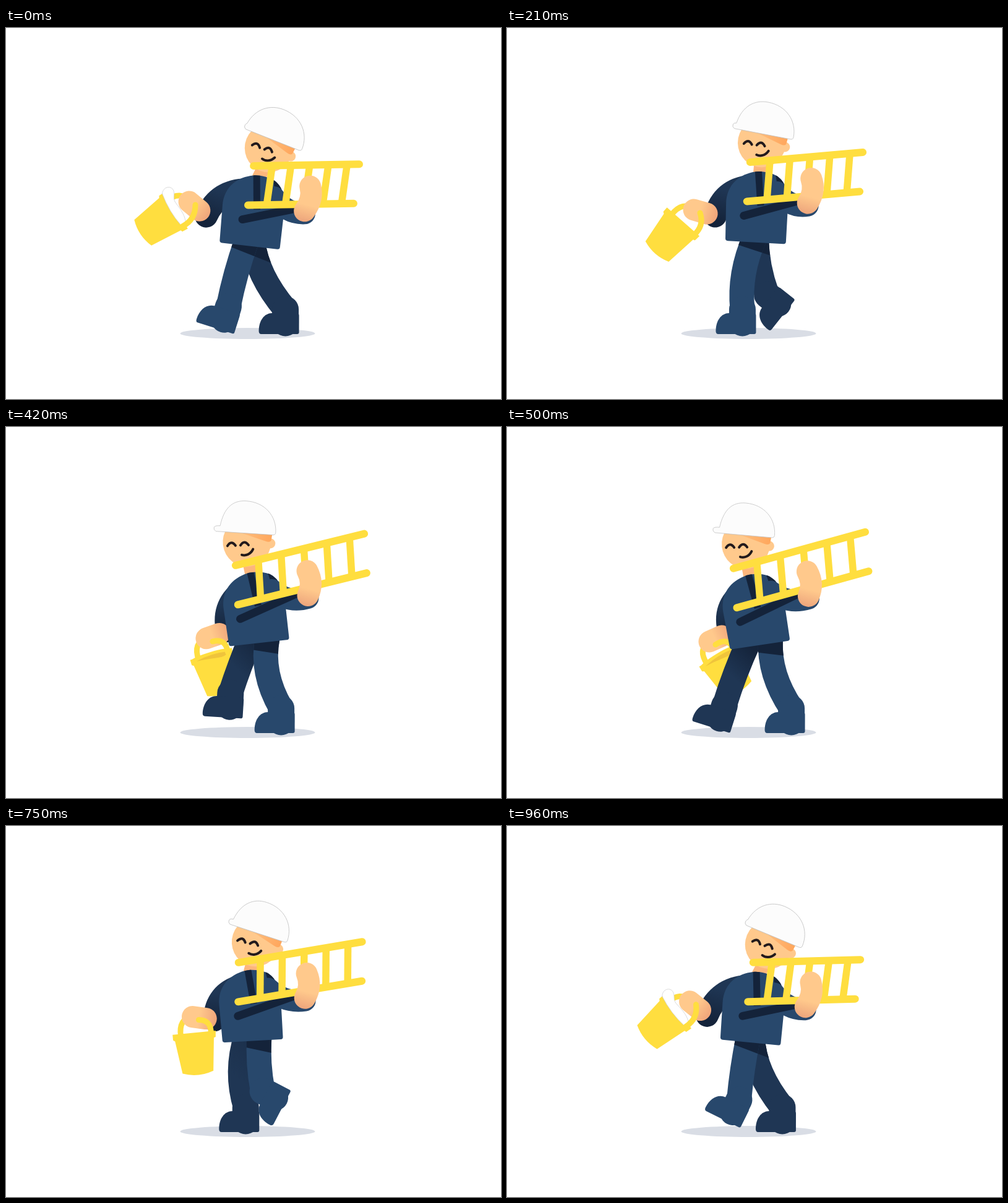
These frames come from a looping animation (800 px wide and 600 px high, 1 s). An HTML page with a canvas:

```html
<!DOCTYPE html>
<html lang="en">
<head>
<meta charset="utf-8">
<title>Walking builder</title>
<style>
html, body { margin: 0; width: 100%; height: 100%; overflow: hidden; background: #fff; }
canvas { display: block; width: 100vw; height: 100vh; }
</style>
</head>
<body>
<canvas id="stage" width="800" height="600"></canvas>
<script>
const g = document.getElementById('stage').getContext('2d');
const BLUE = '#28486c', NAVY = '#1f3654', DARK = '#14233a';
const YELLOW = '#ffde3f', SKIN = '#ffc98c', INK = '#221a1c';
const STEPS = 24, LOOP = 1000, FLOOR = 495;

const rad = deg => deg * Math.PI / 180;
const clamp = v => Math.max(0, Math.min(1, v));
const cyc = (f, n = STEPS) => Math.cos(2 * Math.PI * f / n);

// One swing per loop, plus an optional one per footstep; each with its peak step
const wave = (f, mean, amp, peak, amp2 = 0, peak2 = 0) =>
  mean + amp * cyc(f - peak) + amp2 * cyc(f - peak2, STEPS / 2);

// The body sinks sharply when a foot lands
const bob = f => 7 * ((1 + cyc(f - 1, STEPS / 2)) / 2) ** 5 - 1.7 * cyc(f - 3, STEPS / 2);

// Maps points of a turned part to the stage
function turn(x, y, deg) {
  const c = Math.cos(rad(deg)), s = Math.sin(rad(deg));
  return (px, py) => [x + px * c - py * s, y + px * s + py * c];
}

function local(x, y, deg, draw) {
  g.save();
  g.translate(x, y);
  g.rotate(rad(deg));
  draw();
  g.restore();
}

const fill = (d, color) => { g.fillStyle = color; g.fill(new Path2D(d)); };

function line(d, color, w, cap = 'round') {
  g.strokeStyle = color;
  g.lineWidth = w;
  g.lineCap = cap;
  g.lineJoin = 'round';
  g.stroke(new Path2D(d));
}

function ramp(x0, y0, x1, y1, from, to) {
  const r = g.createLinearGradient(x0, y0, x1, y1);
  r.addColorStop(0, from);
  r.addColorStop(1, to);
  return r;
}

function dot(x, y, rx, ry, color) {
  g.fillStyle = color;
  g.beginPath();
  g.ellipse(x, y, rx, ry, 0, 0, 7);
  g.fill();
}

function torsoPose(f) {
  const x = wave(f, 401.3, 8, 10.8), y = 347.6 + bob(f), deg = wave(f, -.95, 7.8, 1.1);
  return { x, y, deg, at: turn(x, y, deg) };
}

// p = 0: the heel lands; p = 12: the foot starts to leave the floor
function legPose(p, side, body) {
  const s = Math.max(0, p / 12 - 1);
  const lift = 70 * Math.sin(Math.PI * s ** 1.2) ** 2;
  const near = (p - 22.8 + 36) % STEPS - 12;
  const toeUp = Math.abs(near) < 2.5 ? 33 * Math.cos(Math.PI * near / 5) ** 2 : 0;
  const heel = { x: wave(p, 428, 60.6, 13.4, 7, 6) + side * 4, y: FLOOR - lift, deg: toeUp - .93 * lift };
  const at = turn(heel.x, heel.y, heel.deg);
  const hip = [body.x + wave(p, 0, 12, 13.5) + side * 6, body.y - 8];
  const ankle = at(-22, -40);
  const bend = 2 * wave(p, -6, 5, 9.5 + 12);
  const knee = [(hip[0] + ankle[0]) / 2 + bend, (hip[1] + ankle[1]) / 2];
  const limb = `M${hip}Q${knee} ${ankle}`;
  return { heel, limb, hip, knee, cuff: `M${ankle}L${at(-22, -18)}` };
}

function drawLeg(leg, body, color, shade) {
  line(leg.limb, color, 40);
  line(leg.cuff, color, 43);
  if (shade > 0) {
    const [hx, hy] = leg.hip, [kx, ky] = leg.knee;
    line(leg.limb, ramp(hx + 10, hy + 18, kx - 4, ky + 6, `rgba(20,35,58,${shade})`, 'rgba(20,35,58,0)'), 40);
  }
  local(leg.heel.x, leg.heel.y, leg.heel.deg, () =>
    fill('M-3,0H-61Q-65,0 -65,-5C-65,-22 -56,-34 -43,-34H-4Q0,-34 0,-30V-3Q0,0 -3,0Z', color));
  // Shade under the jacket
  g.save();
  const corners = [[-70, -30], [70, -30], [70, 32], [-70, -6]].map(c => body.at(...c));
  g.clip(new Path2D(`M${corners.join('L')}Z`));
  if (shade <= 0) line(leg.limb, DARK, 40);
  g.restore();
}

function drawBucket(x, y, deg, f) {
  local(x, y, deg, () => {
    fill('M-35,-2H35L34,8L31,9L25,62Q0,71 -25,62L-32,9L-35,7Z', YELLOW);
    g.globalAlpha = clamp(3 * cyc(f - 11));
    dot(0, 0, 34, 5, YELLOW);
    fill('M-26,3Q0,-3 28,2Q22,10 8,7Q-10,4 -26,3Z', '#efc43c');
    g.globalAlpha = clamp((deg - 45) / 4);
    const paint = 'M-35,1C-44,-6 -39,-19 -29,-17C-21,-15 -20,-8 -9,-9C4,-10 16,-10 26,-4L24,4Q-4,8 -35,1Z';
    fill(paint, '#fff');
    line(paint, '#cfcfcf', .7);
  });
}

function drawRearArm(f, body) {
  const fx = wave(f, 307.5, 15.6, 11.5, 4, 0), fy = wave(f, 310, 33.1, 12.3, 5, 10.8);
  const along = turn(fx, fy, wave(f, 8, 32, 0));
  const [sx, sy] = body.at(-13, -90), [wx, wy] = along(36, 0);
  const len = Math.hypot(wx - sx, wy - sy);
  const ex = (sx + wx) / 2 - 26 * (wy - sy) / len, ey = (sy + wy) / 2 + 26 * (wx - sx) / len;
  line(`M${sx},${sy}Q${ex},${ey} ${wx},${wy}`, ramp(ex, ey, wx, wy + 8, NAVY, DARK), 37);

  const deg = wave(f, 12.5, 47.4, 1.5);
  const [bx, by] = turn(fx, fy, deg)(0, 28);
  const at = turn(bx, by, deg);
  line(`M${at(-22, 2)}Q${at(-23, -28)} ${fx},${fy}`, YELLOW, 9);
  drawBucket(bx, by, deg, f);
  line(`M${along(22, 0)}L${fx},${fy}`, ramp(...along(38, 0), ...along(10, 0), '#f0a67b', SKIN), 35);
  line(`M${fx + 10},${fy + 5}Q${at(30, -20)} ${at(27, 3)}`, YELLOW, 9);
}

const jacket = new Path2D('M-45,0H45Q49,0 49,-4V-60C49,-85 43,-100 29,-109C17,-115 1,-116 -7,-114C-31,-109 -52,-92 -51,-60L-49,-4Q-49,0 -45,0Z');

function drawTorso(body) {
  local(body.x, body.y, body.deg, () => {
    g.fillStyle = BLUE;
    g.fill(jacket);
    g.clip(jacket);
    line('M-2,-118L5,-60', DARK, 11, 'butt');
    line('M31,-116L41,-68', DARK, 11, 'butt');
  });
}

function drawHead(x, y, f) {
  const deg = wave(f, 13.4, 9.6, 22), nub = wave(f, 6, 4, 12);
  local(x, y, deg, () => {
    dot(38, 0, 8, 8, SKIN);
    dot(0, 0, 39, 40, SKIN);
    fill('M-18,-16L30,-3Q37,-1 39,-5L40,-16Z', ramp(-18, -16, 36, -6, '#ffc284', '#ffa85e'));
    local(-19 - nub * .6, 4 + nub * .25, wave(f, -4.5, 2, 0), () => {
      const eye = 'M-6.5,1.5Q0,-8 6.5,1.5';
      line(eye, INK, 4);
      line('M16,17C22,19 30,17 34.5,8.5', INK, 4);
      g.translate(21, 0);
      line(eye, INK, 4);
    });
    g.translate(-48 - nub * .7, -15);
    g.scale(1.02, 1.02);
    const hat = `M3,1Q-1,-1 0,-5Q1,-8 ${nub},-8C${nub + 4},-36 26,-50 48,-50C78,-50 98,-29 98,-3Q98,1 94,1Z`;
    fill(hat, '#fcfcfc');
    line(hat, '#bdbdbd', .7);
  });
}

// Both rails share tilt and length; the lower one slides as the ladder tips
function ladderPose(f, hx, hy) {
  const deg = wave(f, -8.2, 7.4, .7), half = wave(f, 98, 13, 13);
  const slide = -10 - deg;
  const x = hx + wave(f, -9.5, 3.5, 1), y = hy - 34.5;
  return { half, slide, top: turn(x, y, deg), low: turn(x + slide, y + 63.5, deg) };
}

function drawLadder({ half, top, low }) {
  for (let i = 1; i <= 5; i++) {
    const k = half * (.354 * i - 1);
    line(`M${top(k, 0)}L${low(k, 0)}`, YELLOW, 11.5, 'butt');
  }
  for (const rail of [top, low]) line(`M${rail(-half, 0)}L${rail(half, 0)}`, YELLOW, 12);
}

function draw(f) {
  g.fillStyle = '#fff';
  g.fillRect(0, 0, 800, 600);
  dot(390.5, 494, 109, 9, '#d9dde5');

  const body = torsoPose(f);
  const headX = wave(f, 405.5, 19.5, .3), headY = wave(f, 186.4, 2.3, 22.5) + bob(f);
  const topX = wave(f, 488.5, 4, 2.5), topY = wave(f, 240, 11.3, .5) + bob(f);
  const lowX = wave(f, 485, 3, 9.5), lowY = topY + 39.7;
  const ladder = ladderPose(f, topX, topY);

  drawRearArm(f, body);
  const stride = cyc(f - 13);
  drawLeg(legPose((f + STEPS / 2) % STEPS, -1, body), body, NAVY, stride);
  drawLeg(legPose(f, 1, body), body, BLUE, 0);

  line(`M${headX},${headY + 15}L${body.at(1, -108)}`, '#fdb67c', 22, 'butt');
  drawTorso(body);
  line(`M${body.at(30, -83)}Q${body.at(54, -58)} ${lowX},${lowY + 4}`, BLUE, 35);
  const [rx, ry] = ladder.low(-ladder.half, 0);
  line(`M${rx + ladder.slide},${ry + 23}L${lowX - 18},${lowY - 3}`, DARK, 13);
  drawHead(headX, headY, f);
  drawLadder(ladder);
  line(`M${topX},${topY}Q${(topX + lowX) / 2 + 10},${topY + 20} ${lowX},${lowY}`,
    ramp(lowX - 4, lowY + 17, lowX + 3, lowY - 10, '#eda57c', SKIN), 35);
}

// Poses change in steps rounded to 10 ms
const start = performance.now();
function tick() {
  const t = (performance.now() - start) % LOOP;
  let f = STEPS - 1;
  while (Math.round(f * 100 / STEPS) * 10 > t) f--;
  draw(f);
  requestAnimationFrame(tick);
}
tick();
</script>
</body>
</html>
```
